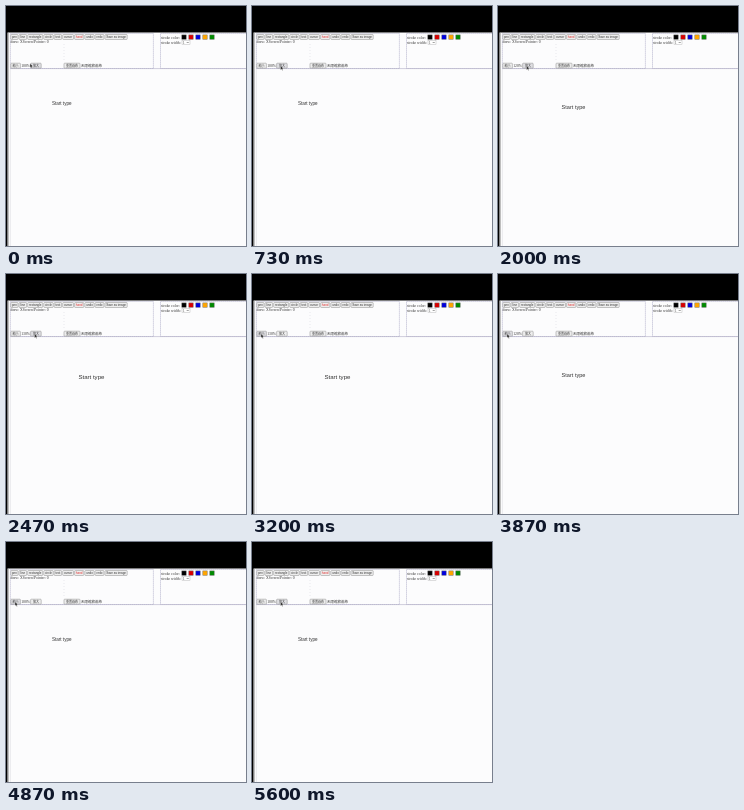
An HTML page for the animation above (5670 ms loop, 240 by 240 pixels).

```html
<!DOCTYPE html>
<html lang="zh">
<head>
<meta charset="utf-8">
<style>
html, body { margin: 0; width: 100%; height: 100%; overflow: hidden; background: #000; }
svg { display: block; width: 100vw; height: 100vh; }
text { font-family: "Liberation Serif", "Noto Sans CJK SC", serif; font-size: 3.75px; fill: #333; }
.btn text, #label { font-family: "Liberation Sans", "Noto Sans CJK SC", sans-serif; }
.btn text { font-size: 3px; text-anchor: middle; }
.btn rect { fill: #eeeeee; stroke: #8b8b8b; stroke-width: .5; }
.box { fill: none; stroke: #aaa8c4; stroke-width: .7; stroke-dasharray: 1.2 .8; }
</style>
</head>
<body>
<svg id="stage" viewBox="0 0 240 240">
  <rect width="240" height="240" fill="#000"/>
  <rect x="1.5" y="26.5" width="239" height="214" fill="#fcfcfd"/>
  <path d="M2.2 27V240" stroke="#8c8c8c" stroke-width=".8"/>
  <rect class="box" x="4.4" y="27.5" width="143" height="35"/>
  <rect class="box" x="154.5" y="27.5" width="90" height="35"/>
  <path d="M4 62.6H240" stroke="#b0aec6" stroke-width=".6"/>
  <path d="M4.4 63V240" stroke="#dcdce2" stroke-width=".6"/>
  <path d="M58 38V56" stroke="#d4d4dc" stroke-width=".5" stroke-dasharray="1 2"/>
  <g id="tools"></g>
  <text x="4.5" y="37.3">draw: XScreen/Pointer: 0</text>
  <text id="percent" x="15.2" y="61">100%</text>
  <text x="75" y="61" style="font-size:3.5px">无限缩放画布</text>
  <text x="155" y="32.7">stroke color:</text>
  <text x="155" y="37.6">stroke width:</text>
  <rect x="176" y="34.5" width="8" height="4" fill="#fff" stroke="#aaa" stroke-width=".4"/>
  <text x="177" y="37.6" style="font-size:3.2px">1</text>
  <path d="M180.7 36l1 1 1-1" fill="none" stroke="#333" stroke-width=".5"/>
  <g id="swatches"></g>
  <text id="label" x="46" y="98.5">Start type</text>
  <path id="cursor" d="M0 0V4.2L1 3.3 1.7 4.8 2.4 4.5 1.8 3H3.1Z" fill="#222" stroke="#fff" stroke-width=".35"/>
</svg>
<script>
const LOOP = 5670;
const $ = id => document.getElementById(id);

function add(parent, tag, attrs, content = "") {
  const el = document.createElementNS("http://www.w3.org/2000/svg", tag);
  for (const key in attrs) el.setAttribute(key, attrs[key]);
  el.textContent = content;
  parent.append(el);
  return el;
}

function button(name, x, y, width, color = "#333") {
  const g = add($("tools"), "g", { class: "btn" });
  const face = add(g, "rect", { x, y, width, height: 5, rx: .7 });
  add(g, "text", { x: x + width / 2, y: y + 3.6, style: `fill:${color}` }, name);
  return face;
}

[["pen", 4.8, 7.2], ["line", 13, 7.6], ["rectangle", 21.7, 15],
 ["circle", 37.8, 9.4], ["text", 48.2, 7.4], ["cursor", 56.7, 10.8],
 ["hand", 68.6, 9.2, "#e03030"], ["undo", 78.9, 9.2],
 ["redo", 89.1, 8.8], ["Save as image", 99, 22.2]]
  .forEach(([name, x, w, color]) => button(name, x, 28.5, w, color));
const minus = button("缩小", 4.8, 57.2, 9.6);
const plus = button("放大", 24.6, 57.2, 10.6);
button("重置画布", 58, 57.2, 16);

["#000000", "#d80000", "#0000dc", "#ffa500", "#008a00"].forEach((fill, i) =>
  add($("swatches"), "rect",
    { x: 175.8 + i * 7, y: 28.9, width: 4.4, height: 4.4, fill, stroke: "#777", "stroke-width": .5 }));

// [time, zoom level]
const zooms = [[0, 0], [1200, 1], [1670, 2], [2200, 3], [3600, 2], [4130, 1], [4600, 0]];
// [time, x, y]
const path = [[0, 24, 57.5], [400, 28.5, 59.8], [2600, 28.5, 59.8], [3200, 9, 59.8],
              [4900, 9, 59.8], [5400, 28.5, 59.8], [LOOP, 28.5, 59.8]];

function cursorAt(t) {
  const i = path.findIndex(p => p[0] > t);
  const a = path[i - 1], b = path[i];
  const u = (t - a[0]) / (b[0] - a[0]);
  const e = u * u * (3 - 2 * u);
  return [a[1] + (b[1] - a[1]) * e, a[2] + (b[2] - a[2]) * e];
}

function draw(t) {
  const level = zooms.filter(z => z[0] <= t).pop()[1];
  const label = $("label");
  label.setAttribute("x", 46 + 8.8 * level);
  label.setAttribute("y", 98.5 + 2.15 * level);
  label.style.fontSize = 4.55 + .51 * level + "px";
  $("percent").textContent = 100 + 10 * level + "%";
  const [x, y] = cursorAt(t);
  $("cursor").setAttribute("transform", `translate(${x} ${y})`);
  plus.style.fill = x >= 24 ? "#dedee2" : "";
  minus.style.fill = x < 14.4 ? "#dedee2" : "";
}

const start = performance.now();
function tick() {
  draw((performance.now() - start) % LOOP);
  requestAnimationFrame(tick);
}
tick();
</script>
</body>
</html>
```
